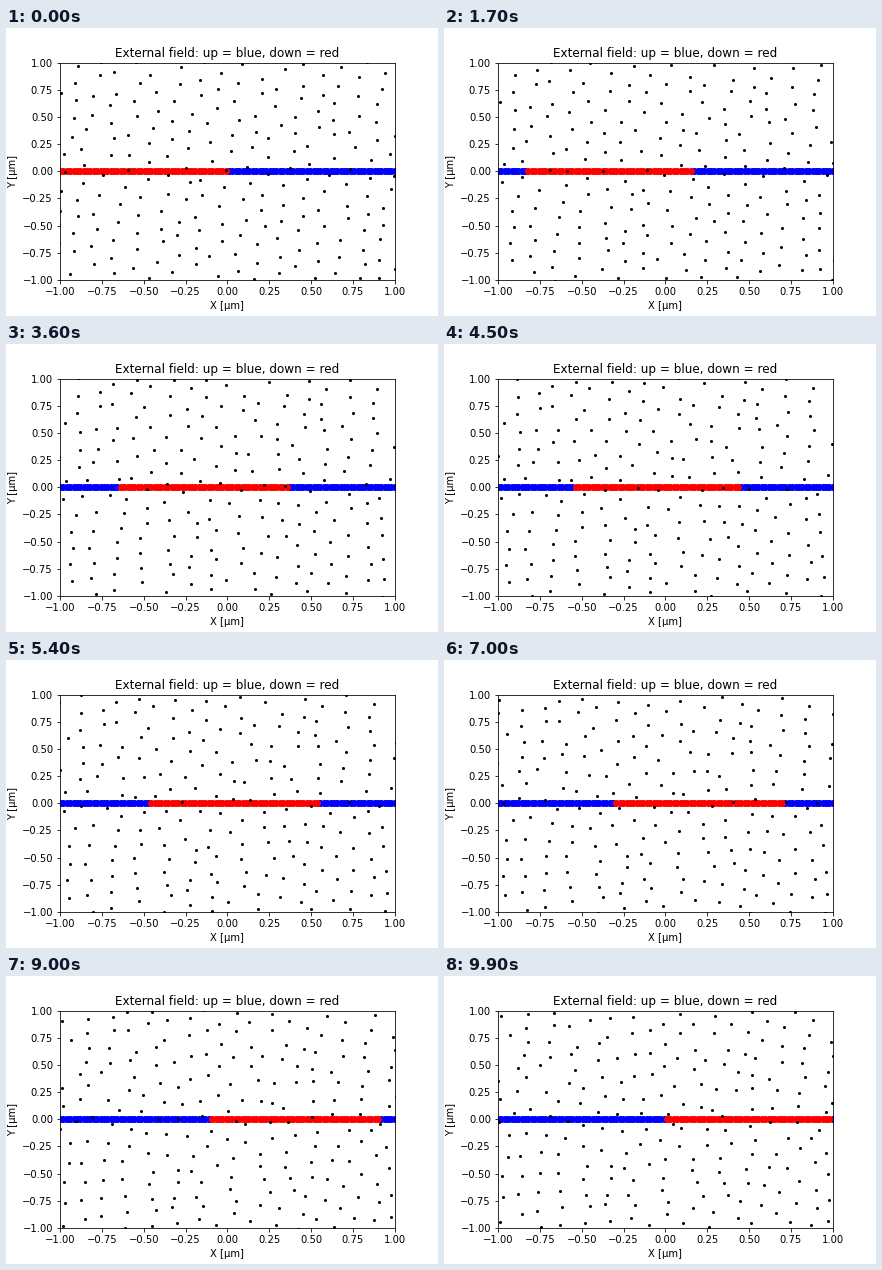
These frames come from a looping animation (432x288 px, 10 s). A matplotlib script:

```python
import numpy as np
import matplotlib.pyplot as plt
from matplotlib.animation import FuncAnimation

FRAMES = 100
SPEED = 0.0055              # tracer displacement per frame for unit flow
CORE = 0.03                 # softens the flow close to a bead
PITCH_X, PITCH_Y = 0.122, 0.161
LEAN = 0.09                 # sideways tilt of the tracer columns

beads = np.linspace(-1, 1, 100)


def is_down(k):
    """Beads inside the down domain, which slides right by 0.01 per frame."""
    start = -1 + k / FRAMES
    return (beads >= start) & (beads < start + 1)


def flow(p, k):
    """Planar Stokes flow of a row of vertical point forces."""
    force = np.where(is_down(k), -1.0, 1.0)
    dx = p[:, :1] - beads
    dy = p[:, 1:]
    r2 = dx**2 + dy**2 + CORE**2
    ux = force * dx * dy / r2
    uy = force * (dy**2 / r2 - 0.5 * np.log(r2))
    return 2 * np.column_stack([ux.mean(axis=1), uy.mean(axis=1)])


def seed_tracers():
    """Leaning, staggered lattice that extends beyond the visible box."""
    rng = np.random.default_rng(4)
    col, row = np.meshgrid(np.arange(-11, 12), np.arange(-11, 12))
    y = PITCH_Y * (row + 0.38 * col % 1)
    x = PITCH_X * col + LEAN * y
    p = np.column_stack([x.ravel(), y.ravel()])
    return p + rng.normal(0, 0.016, p.shape)


def trace():
    path = [seed_tracers()]
    for k in range(FRAMES - 1):
        p = path[-1]
        mid = p + 0.5 * SPEED * flow(p, k)
        path.append(p + SPEED * flow(mid, k))
    return path


path = trace()

plt.rcParams["font.family"] = "DejaVu Sans"
fig, ax = plt.subplots(figsize=(6, 4), dpi=72)
fig.subplots_adjust(left=0.125, right=0.9, bottom=0.125, top=0.88)
ax.set(xlim=(-1, 1), ylim=(-1, 1), xlabel="X [µm]", ylabel="Y [µm]")
ax.set_title("External field: up = blue, down = red")

up, = ax.plot([], [], "o", color="blue", ms=6)
down, = ax.plot([], [], "o", color="red", ms=6)
tracers, = ax.plot([], [], "ko", ms=2)


def update(k):
    red = is_down(k)
    for line, mask in ((up, ~red), (down, red)):
        line.set_data(beads[mask], np.zeros(mask.sum()))
    tracers.set_data(path[k].T)
    return up, down, tracers


anim = FuncAnimation(fig, update, frames=FRAMES, interval=1000 * 10 // FRAMES,
                     repeat=True, repeat_delay=0)
plt.show()
```
